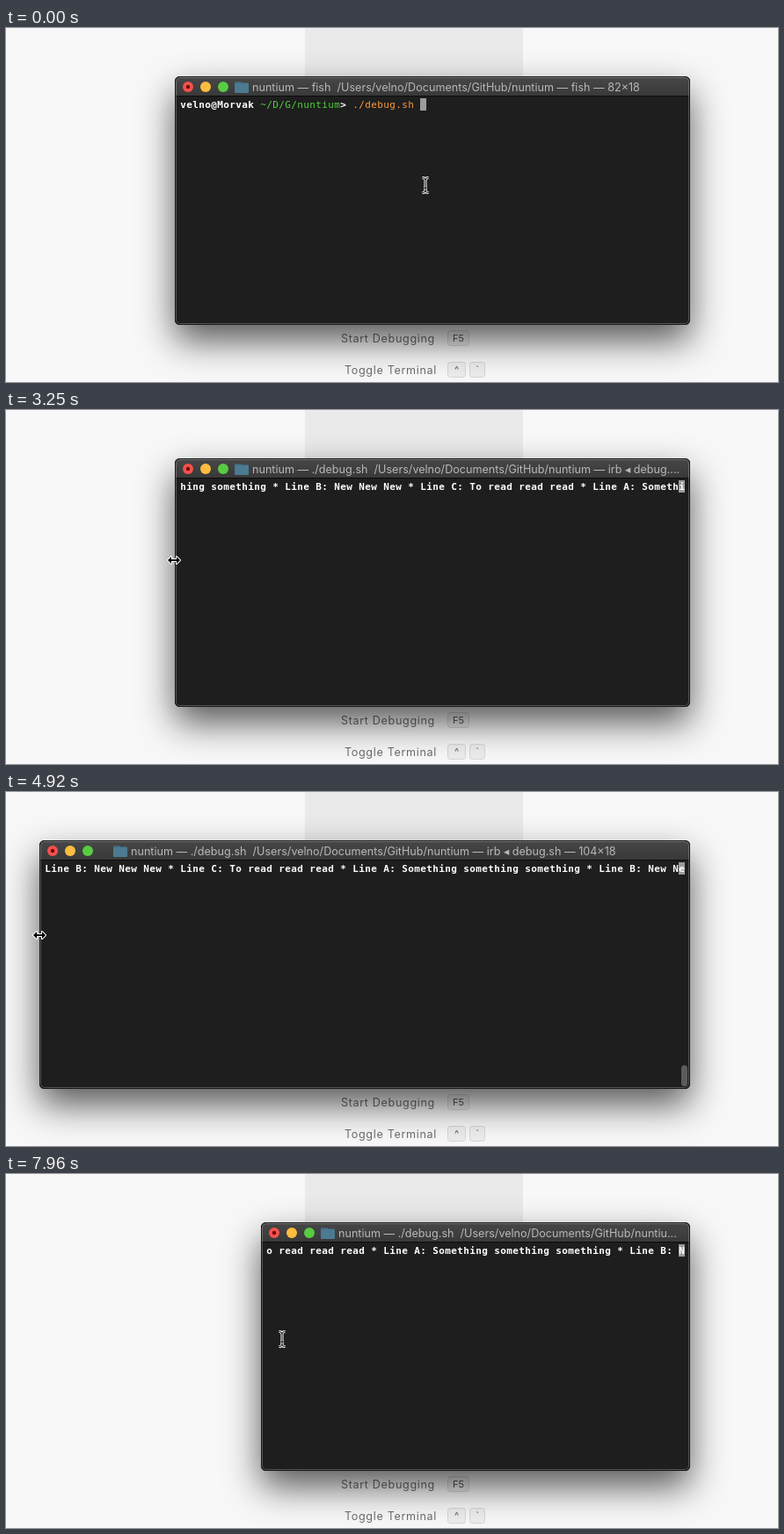
Write an HTML page with a canvas that moves like this. It is 878x403 px and loops after 7.99 s.

```html
<!DOCTYPE html>
<html lang="en">
<head>
<meta charset="utf-8">
<title>Terminal ticker</title>
<style>
  html, body { margin: 0; width: 100%; height: 100%; overflow: hidden; background: #f8f8f8; }
  canvas { display: block; }
</style>
</head>
<body>
<canvas id="stage" width="878" height="403"></canvas>
<script>
const ctx = document.getElementById('stage').getContext('2d');
const LOOP = 7990, CELL_W = 7, CELL_H = 14, RIGHT = 778, TOP = 55, BOTTOM = 338;
const MIN_LEFT = 38, MAX_COLS = 104;
const SANS = 'Inter, "Open Sans", sans-serif';
const MONO = '"DejaVu Sans Mono", monospace';
const TICKER = 'Line A: Something something something * Line B: New New New * Line C: To read read read * ';
const PATH = '/Users/velno/Documents/GitHub/nuntium';
const PROMPT = [
  ['velno@Morvak ', '#fff', 'bold'],
  ['~/D/G/nuntium', '#4fd13c', 'normal'],
  ['> ', '#fff', 'bold'],
  ['./debug.sh ', '#fd9a3b', 'normal'],
];

// [time, ticker step]
const TICKS = [[960, 0], [2245, 13], [2630, 17], [3340, 24], [3998, 31], [5110, 42], [5900, 50], [7960, 71], [8060, 72]];
// [time, x, y]
const MOUSE = [
  [0, 477, 179], [1700, 477, 179], [1760, 474, 190], [1850, 420, 193], [2000, 300, 188],
  [2240, 197, 171], [2400, 190, 172], [2540, 191, 171], [3850, 191, 171], [3970, 143, 170],
  [4000, 130, 170], [4200, 48, 165], [4280, 38, 163], [5930, 38, 163], [5960, 37, 162],
  [6580, 37, 162], [6720, 95, 166], [6850, 192, 171], [6880, 200, 171], [7000, 245, 172],
  [7200, 280, 172], [7420, 290, 172], [7600, 290, 172], [7800, 308, 185], [7960, 314, 188],
];

const POINTERS = {
  beam: new Path2D('M-3.5-8.5Q0-8.5 0-6Q0-8.5 3.5-8.5M0-6V6M-3.5 8.5Q0 8.5 0 6Q0 8.5 3.5 8.5M-2 3H2'),
  resize: new Path2D('M-7 0L-3-4V-1H3V-4L7 0L3 4V1H-3V4Z'),
  arrow: new Path2D('M0 0V14L3.2 11L5.3 16L7.7 15L5.6 10.2H10Z'),
};

const clamp = (v, lo, hi) => Math.min(hi, Math.max(lo, v));

// Piecewise linear lookup between columns of a key list.
function lerpKeys(keys, value, to, from = 0) {
  if (value <= keys[0][from]) return keys[0][to];
  for (let i = 1; i < keys.length; i++) {
    const a = keys[i - 1], b = keys[i];
    if (value <= b[from]) return a[to] + (b[to] - a[to]) * (value - a[from]) / (b[from] - a[from]);
  }
  return keys[keys.length - 1][to];
}

// The window edge trails the pointer and snaps to whole columns.
function leftEdge(t) {
  const x = lerpKeys(MOUSE, clamp(t - 30, 3600, 7500), 1);
  return MIN_LEFT + CELL_W * Math.max(0, Math.round((x - MIN_LEFT) / CELL_W));
}
const columns = left => MAX_COLS - (left - MIN_LEFT) / CELL_W;

function text(str, x, y, color, font) {
  ctx.font = font;
  ctx.fillStyle = color;
  ctx.fillText(str, x, y);
}

function box(x, y, w, h, r, fill, stroke) {
  ctx.beginPath();
  ctx.roundRect(x, y, w, h, r);
  if (fill) { ctx.fillStyle = fill; ctx.fill(); }
  if (stroke) { ctx.strokeStyle = stroke; ctx.lineWidth = 1; ctx.stroke(); }
}

function dot(x, y, r, color) {
  ctx.beginPath();
  ctx.arc(x, y, r, 0, 7);
  ctx.fillStyle = color;
  ctx.fill();
}

function keyCap(label, x, y, w) {
  box(x + .5, y + .5, w - 1, 17, 3, '#ededed', '#d6d6d6');
  ctx.textAlign = 'center';
  text(label, x + w / 2, y + 13, '#555', '11px ' + SANS);
  ctx.textAlign = 'left';
}

function drawBackdrop() {
  ctx.fillStyle = '#f8f8f8';
  ctx.fillRect(0, 0, 878, 403);
  ctx.fillStyle = '#eaeaea';
  ctx.fillRect(340, -188, 248, 248);
  ctx.letterSpacing = '0.65px';
  text('Start Debugging', 381, 358, '#6c6c6c', '12.6px ' + SANS);
  text('Toggle Terminal', 385, 394, '#6c6c6c', '12.6px ' + SANS);
  ctx.letterSpacing = '0px';
  keyCap('F5', 502, 344, 25);
  keyCap('^', 502, 380, 21);
  keyCap('`', 527, 380, 18);
}

function drawTitle(t, left) {
  const size = columns(left) + '×18';
  let title = t < 780
    ? `nuntium — fish\u00a0 ${PATH} — fish — ${size}`
    : `nuntium — ./debug.sh\u00a0 ${PATH} — irb ◂ debug.sh — ${size}`;
  ctx.font = '12.6px ' + SANS;
  const room = 768 - (left + 88);
  if (ctx.measureText(title).width > room) {
    while (ctx.measureText(title + '...').width > room) title = title.slice(0, -1);
    title += '...';
  }
  const width = ctx.measureText(title).width + 20;
  const x = Math.round(Math.max(left + 68, (left + RIGHT - width) / 2));
  box(x, 61, 8, 5, 1, '#3b6479');
  box(x, 62.5, 16, 11.5, 1, '#4b7a91');
  text(title, x + 20, 72, '#b8b8b8', ctx.font);
}

function drawWindow(t, left) {
  const w = RIGHT - left, h = BOTTOM - TOP;
  ctx.save();
  ctx.shadowColor = 'rgba(0,0,0,.65)';
  ctx.shadowBlur = 40;
  ctx.shadowOffsetY = 18;
  box(left, TOP, w, h, 5.5, '#1e1e1e');
  ctx.restore();

  const bar = ctx.createLinearGradient(0, TOP, 0, 77);
  bar.addColorStop(0, '#474747');
  bar.addColorStop(1, '#393939');
  box(left, TOP, w, 22, [5.5, 5.5, 0, 0], bar);
  ctx.fillStyle = '#0c0c0c';
  ctx.fillRect(left + 1, 77, w - 2, 1);
  box(left + 1.5, TOP + 1.5, w - 3, h - 3, 4.5, null, 'rgba(255,255,255,.24)');
  box(left + .5, TOP + .5, w - 1, h - 1, 5.5, null, '#181818');

  ['#f4514d', '#fdbd40', '#58cb42'].forEach((c, i) => dot(left + 15 + 20 * i, 67, 6, c));
  dot(left + 15, 67, 2.2, '#6e0a08');
  drawTitle(t, left);
}

function cell(ch, index, cols, left, color, weight) {
  const x = left + 6 + index % cols * CELL_W;
  const y = 91 + Math.floor(index / cols) * CELL_H;
  text(ch, x + .2, y, color, `${weight} 11px ${MONO}`);
}

function block(col, row, left) {
  ctx.fillStyle = '#9c9c9c';
  ctx.fillRect(left + 6 + col * CELL_W, 80 + row * CELL_H, CELL_W, CELL_H);
}

function drawScreen(t, left) {
  const cols = columns(left);
  if (t < 960) {
    let i = 0;
    for (const [part, color, weight] of PROMPT)
      for (const ch of part) cell(ch, i++, cols, left, color, weight);
    t < 660 ? block(i, 0, left) : block(0, 1, left);
    return;
  }
  if (t >= 6860 && t < 6900) return block(0, 5, left);

  const step = Math.floor(lerpKeys(TICKS, t, 1) + 1e-6);
  // The printed line uses the width known before the latest resize.
  const length = columns(leftEdge(lerpKeys(TICKS, step, 0, 1) - 120));
  const end = length % cols ? length : length - 1;
  block(end % cols, Math.floor(end / cols), left);
  for (let i = 0; i < length; i++)
    cell(TICKER[(step + i) % TICKER.length], i, cols, left, '#fff', 'bold');
}

function drawScrollbar(t) {
  const shown = (from, fade, to) => t < from ? 0 : clamp((to - t) / (to - fade), 0, 1);
  const alpha = t < 5500 ? shown(3880, 4830, 5030) : shown(6640, 7540, 7740);
  if (alpha) box(768, t < 5500 ? 311 : 310, 7, 24, 3.5, `rgba(160,160,160,${alpha * .88})`);
}

function drawPointer(t) {
  const kind = t < 2380 || t >= 7640 ? 'beam' : t >= 3900 && t < 4220 ? 'arrow' : 'resize';
  const shape = POINTERS[kind];
  ctx.save();
  ctx.translate(Math.round(lerpKeys(MOUSE, t, 1)), Math.round(lerpKeys(MOUSE, t, 2)));
  ctx.lineJoin = 'round';
  ctx.strokeStyle = '#fff';
  ctx.lineWidth = kind === 'beam' ? 3 : 2;
  ctx.stroke(shape);
  if (kind === 'beam') {
    ctx.strokeStyle = '#000';
    ctx.lineWidth = 1;
    ctx.stroke(shape);
  } else {
    ctx.fillStyle = '#000';
    ctx.fill(shape);
  }
  ctx.restore();
}

function render() {
  const t = performance.now() % LOOP;
  const left = leftEdge(t);
  drawBackdrop();
  drawWindow(t, left);
  drawScreen(t, left);
  drawScrollbar(t);
  drawPointer(t);
  requestAnimationFrame(render);
}
render();
</script>
</body>
</html>
```
